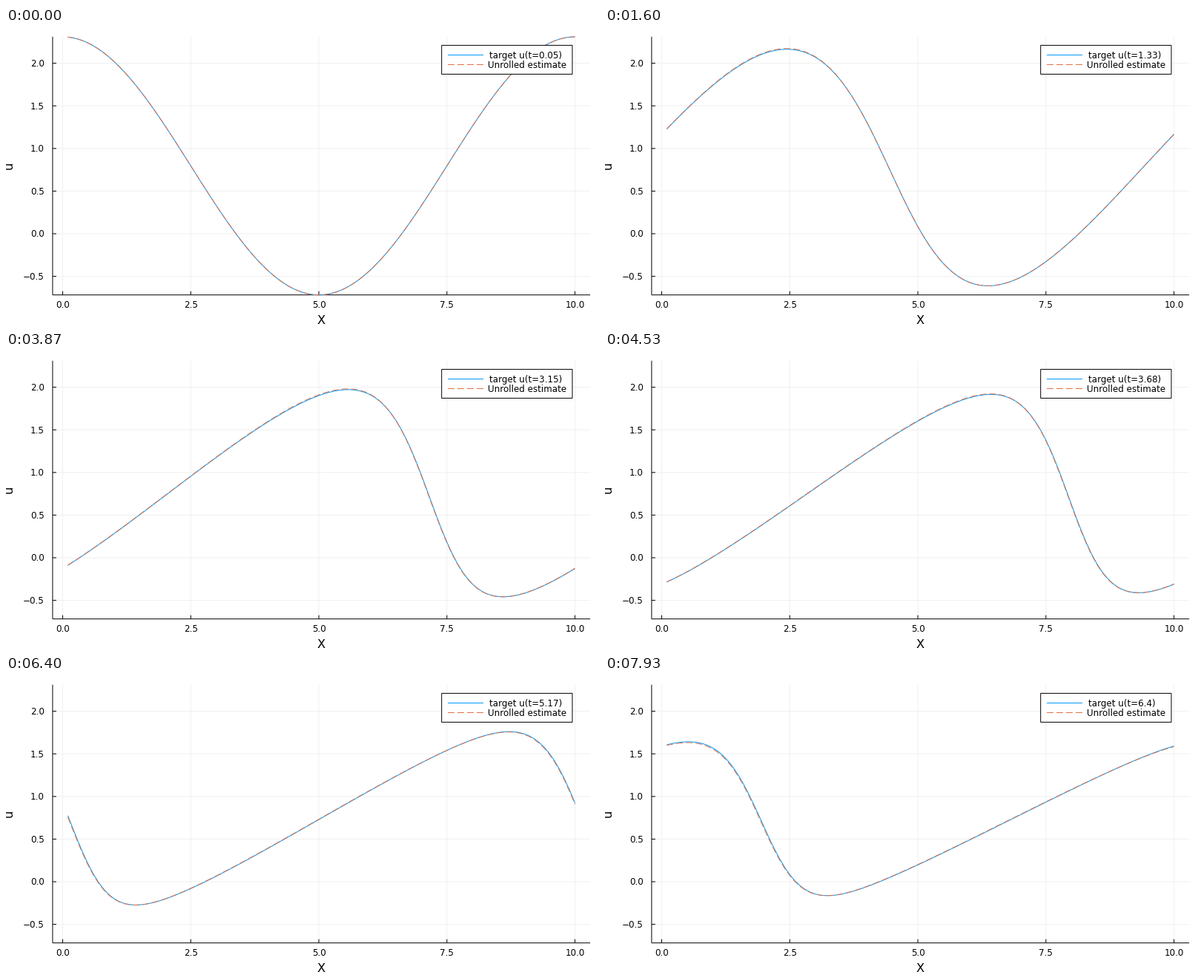
Recreate the animation shown at these times as a matplotlib script. Size 800 by 400 pixels, loop 8 s.

```python
import numpy as np
import matplotlib.pyplot as plt
from matplotlib.animation import FuncAnimation
from matplotlib.patches import Rectangle

W, H, DPI = 800, 400, 100
STEPS, LOOP_MS, TICK_MS = 120, 8000, 20
DT = 8 / 150
LENGTH, POINTS, SUBSTEPS = 10, 100, 8
BLUE, ORANGE = "#009afa", "#e26f46"
LEFT, RIGHT, TOP, BOTTOM = 62.9, 788.1, 11.8, 360.7

plt.rcParams["font.family"] = "DejaVu Sans"
PX = 72 / DPI  # one pixel in points


def px(x):
    return 76.5 + 69.11 * x


def py(u):
    return 278 - 115.2 * u


# Viscous Burgers-type wave on a periodic domain, spectral in space.
x = LENGTH / POINTS * np.arange(1, POINTS + 1)
ik = 2j * np.pi * np.fft.rfftfreq(POINTS, LENGTH / POINTS)


def slope(u):
    return np.fft.irfft(ik * np.fft.rfft(u), POINTS)


def rate(u):
    uh = np.fft.rfft(u)
    ux = np.fft.irfft(ik * uh, POINTS)
    uxx = np.fft.irfft(ik ** 2 * uh, POINTS)
    return -(1.239 + 0.33 * u) * ux + (0.156 + 0.02 * u) * uxx


def advance(u):
    h = DT / SUBSTEPS
    for _ in range(SUBSTEPS):
        a = rate(u)
        b = rate(u + h / 2 * a)
        c = rate(u + h / 2 * b)
        d = rate(u + h * c)
        u = u + h / 6 * (a + 2 * b + 2 * c + d)
    return u


def estimate(u, t):
    """Slightly lagging copy whose crest drifts above, then below."""
    crest = np.clip((u - 0.78) / (u.max() - 0.78), 0, 1) ** 2
    return u + 0.0022 * t * slope(u) + 0.0105 * np.sin(2 * np.pi * t / 9) * crest


waves = [0.796 + 1.514 * np.cos(2 * np.pi * x / LENGTH)]
while len(waves) < STEPS:
    waves.append(advance(waves[-1]))

fig = plt.figure(figsize=(W / DPI, H / DPI), dpi=DPI, facecolor="white")
ax = fig.add_axes([0, 0, 1, 1])
ax.set_xlim(0, W)
ax.set_ylim(H, 0)
ax.axis("off")


def line(xs, ys, color="black", z=2, **kw):
    return ax.plot(xs, ys, color=color, zorder=z, lw=PX, snap=False,
                   solid_capstyle="butt", dash_capstyle="butt", **kw)[0]


def text(tx, ty, s, size=11.9, **kw):
    return ax.text(tx, ty, s, fontsize=size * PX, zorder=8, va="baseline", **kw)


for v in (0, 2.5, 5, 7.5, 10):
    line([px(v)] * 2, [TOP, BOTTOM], "#f0f0f0", 1)
    line([px(v)] * 2, [BOTTOM, BOTTOM - 5])
    text(px(v), 378.2, f"{v:.1f}", ha="center")
for v in (-0.5, 0, 0.5, 1, 1.5, 2):
    line([LEFT, RIGHT], [py(v)] * 2, "#f0f0f0", 1)
    line([LEFT, LEFT + 5], [py(v)] * 2)
    text(52, py(v) + 4.3, f"{v:.1f}".replace("-", "\u2212"), ha="right")
line([LEFT, LEFT], [TOP, BOTTOM])
line([LEFT, RIGHT], [BOTTOM, BOTTOM])
text(425.5, 400, "X", 16.3, ha="center")
text(8.5, 186, "u", 16.3, rotation=90, rotation_mode="anchor", ha="center")

DASH = dict(ls=(0, (9, 4)))
true_line = line([], [], BLUE, 4)
est_line = line([], [], ORANGE, 5, **DASH)

ax.add_patch(Rectangle((587.7, 23.4), 176.3, 39, fc="white", ec="black", lw=PX,
                       zorder=6, snap=False))
line([596, 644], [36.5, 36.5], BLUE, 7)
line([596, 644], [49.5, 49.5], ORANGE, 7, **DASH)
label = text(651.5, 40.8, "")
text(650.5, 53.8, "Unrolled estimate")


def draw(i):
    # each wave step appears on the nearest clock tick
    k = int((TICK_MS * i + 14) * STEPS / LOOP_MS)
    u = waves[k]
    true_line.set_data(px(x), py(u))
    est_line.set_data(px(x), py(estimate(u, k * DT)))
    label.set_text(f"target u(t={round((k + 1) * DT, 2)})")
    return true_line, est_line, label


anim = FuncAnimation(fig, draw, frames=LOOP_MS // TICK_MS, interval=TICK_MS,
                     repeat=True, repeat_delay=0)
plt.show()
```
